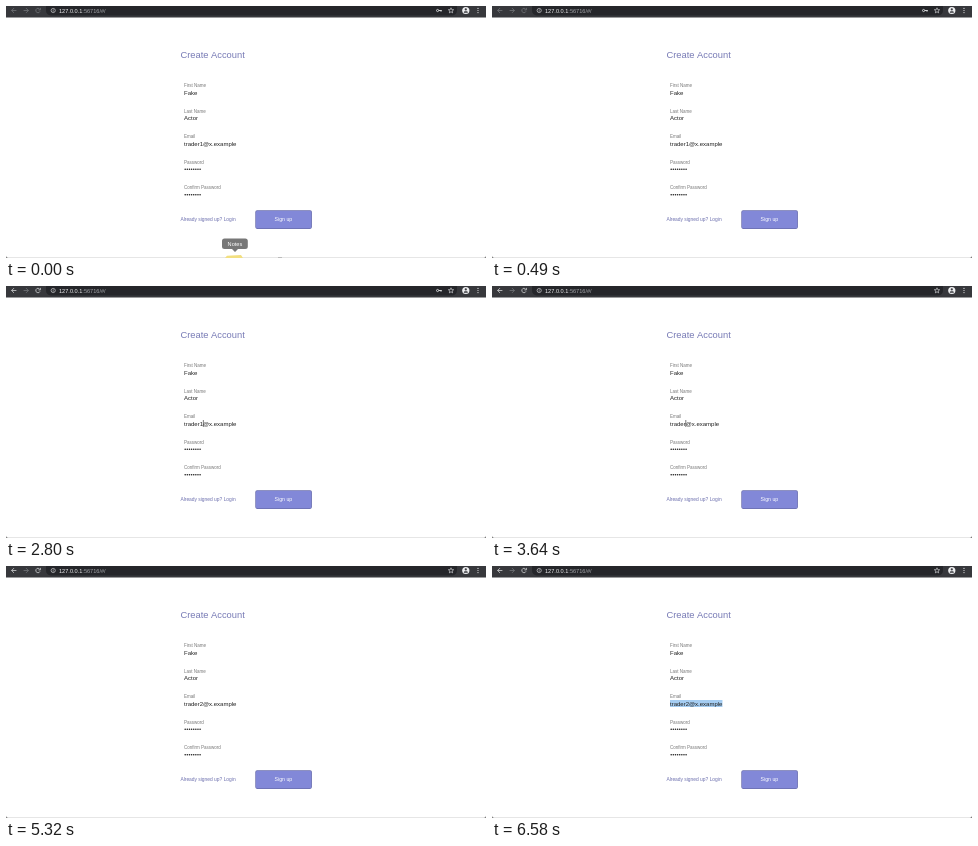
Recreate the animation shown at these times as an HTML page with a canvas. Size 480 by 252 pixels, loop 8 s.

```html
<!DOCTYPE html>
<html lang="en">
<head>
<meta charset="utf-8">
<title>Create Account</title>
<style>
html, body { margin: 0; width: 100%; height: 100%; overflow: hidden; background: #fff; }
canvas { display: block; width: 480px; height: 252px; }
</style>
</head>
<body>
<canvas id="stage"></canvas>
<script>
const W = 480, H = 252, LOOP = 8000;
const canvas = document.getElementById('stage');
const ctx = canvas.getContext('2d');
const dpr = window.devicePixelRatio || 1;
canvas.width = W * dpr;
canvas.height = H * dpr;

const FONT = '"Liberation Sans", Arial, sans-serif';
const BRIGHT = '#e4e5e7', DIM = '#797b80';
const FIELD_X = 178, EMAIL_Y = 139.7;

function text(str, x, y, size, color, align = 'left', weight = 400) {
  ctx.font = `${weight} ${size}px ${FONT}`;
  ctx.textAlign = align;
  ctx.fillStyle = color;
  ctx.fillText(str, x, y);
  return ctx.measureText(str).width;
}

function box(x, y, w, h, r, fill) {
  ctx.beginPath();
  ctx.roundRect(x, y, w, h, r);
  ctx.fillStyle = fill;
  ctx.fill();
}

function disc(x, y, r, fill) {
  ctx.beginPath();
  ctx.arc(x, y, r, 0, Math.PI * 2);
  ctx.fillStyle = fill;
  ctx.fill();
}

function ring(x, y, r, color, width, from = 0, to = Math.PI * 2) {
  ctx.beginPath();
  ctx.arc(x, y, r, from, to);
  ctx.strokeStyle = color;
  ctx.lineWidth = width;
  ctx.stroke();
}

function line(points, color, width) {
  ctx.beginPath();
  points.forEach(([x, y]) => ctx.lineTo(x, y));
  ctx.strokeStyle = color;
  ctx.lineWidth = width;
  ctx.stroke();
}

function arrow(x, y, dir, color) {
  line([[x - 2.4 * dir, y], [x + 2.4 * dir, y]], color, 0.7);
  line([[x, y - 2.4], [x + 2.4 * dir, y], [x, y + 2.4]], color, 0.7);
}

function star(x, y) {
  ctx.beginPath();
  for (let i = 0; i < 10; i++) {
    const r = i % 2 ? 1.2 : 2.8, a = i * Math.PI / 5 - Math.PI / 2;
    ctx.lineTo(x + r * Math.cos(a), y + r * Math.sin(a));
  }
  ctx.closePath();
  ctx.strokeStyle = BRIGHT;
  ctx.lineWidth = 0.6;
  ctx.stroke();
}

function toolbar(t) {
  box(0, 0, W, 11.5, 0, '#37383c');
  box(40, 0, 411, 9.5, [0, 0, 4.7, 4.7], '#25262a');
  const active = t >= 840 ? BRIGHT : DIM;
  arrow(8, 4.5, -1, active);
  arrow(20, 4.5, 1, DIM);
  ring(32, 4.5, 2.2, active, 0.7, 0.4, 5.4);
  line([[34.4, 1.9], [34.4, 3.9], [32.4, 3.9]], active, 0.7);

  ring(47.2, 4.5, 2.1, BRIGHT, 0.6);
  line([[47.2, 4.2], [47.2, 5.7]], BRIGHT, 0.6);
  disc(47.2, 3.3, 0.35, BRIGHT);
  const hostWidth = text('127.0.0.1', 53, 6.5, 5.6, '#f0f0f1', 'left', 500);
  text(':56716/#/', 53 + hostWidth, 6.5, 5.6, '#a2a4a8');

  if (t < 3640) {
    ring(431.6, 4.5, 1.1, BRIGHT, 0.8);
    line([[432.7, 4.5], [435.8, 4.5]], BRIGHT, 0.9);
    line([[435, 4.5], [435, 5.8]], BRIGHT, 0.8);
  }
  star(445, 4.6);
  disc(459.8, 4.5, 3.6, '#eeeff1');
  disc(459.8, 3.4, 1.1, '#37383c');
  box(457.8, 5.2, 4, 1.5, [1.2, 1.2, 0, 0], '#37383c');
  [2.4, 4.5, 6.6].forEach(y => disc(472, y, 0.6, BRIGHT));
}

function within(t, spans) {
  return spans.some(([from, to]) => t >= from && t < to);
}

function email(t) {
  const name = 'trader' + (t < 3570 ? '1' : t < 3990 ? '' : '2');
  const full = name + '@x.example';
  ctx.font = `400 6px ${FONT}`;
  const caretX = FIELD_X + ctx.measureText(name).width;
  const end = FIELD_X + ctx.measureText(full).width;

  if (t >= 6230) {
    const from = t < 6580 ? caretX : FIELD_X;
    box(from, 134, end - from, 7, 0, '#a5cdf2');
  }
  text(full, FIELD_X, EMAIL_Y, 6, '#222');
  const caretOn = [[1610, 1960], [2800, 3220], [3570, 4620], [4830, 5320], [5810, 6230]];
  if (within(t, caretOn)) box(caretX - 0.1, 134, 0.6, 7, 0, '#222');
}

function form(t) {
  text('Create Account', 174.4, 51.8, 9.36, '#777ab5');
  ['First Name', 'Last Name', 'Email', 'Password', 'Confirm Password'].forEach((label, i) =>
    text(label, FIELD_X, 81.2 + i * 25.5, 4.5, '#777'));
  text('Fake', FIELD_X, 88.8, 6, '#222');
  text('Actor', FIELD_X, 114.2, 6, '#222');
  email(t);
  for (const y of [163.3, 188.8])
    for (let i = 0; i < 8; i++) disc(179.2 + i * 2.13, y, 0.8, '#222');

  text('Already signed up? Login', 174.4, 215.2, 4.9, '#6c6fae');
  box(249.3, 204.2, 56.6, 18.7, 1.8, '#686cac');
  box(250, 204.9, 55.2, 17.3, 1.3, '#8288d8');
  text('Sign up', 277.4, 215.4, 5.2, '#fff', 'center');
}

// The dock label slides down and fades in 70 ms steps.
function dockLabel(t) {
  if (t >= 490) return;
  const step = t < 140 ? 0 : Math.floor(t / 70) - 1;
  const dx = Math.min(4.5, step * 1.5), dy = step * 2.9;
  ctx.save();
  if (step < 2) {
    ctx.translate(0, dy);
    ctx.beginPath();
    ctx.moveTo(219, 252);
    ctx.lineTo(221, 249.8);
    ctx.lineTo(235, 249);
    ctx.lineTo(237, 252);
    ctx.fillStyle = '#f2df80';
    ctx.fill();
    box(272, 251, 4, 1, 0, '#bbb');
    ctx.translate(0, -dy);
  }
  ctx.translate(dx, dy);
  ctx.globalAlpha = 1 - step * 0.1;
  ctx.beginPath();
  ctx.roundRect(216, 232.4, 25.8, 10.6, 2.5);
  ctx.moveTo(226, 243);
  ctx.lineTo(229, 246);
  ctx.lineTo(232, 243);
  ctx.fillStyle = '#777';
  ctx.fill();
  text('Notes', 228.9, 239.7, 5.6, '#fff', 'center');
  ctx.restore();
}

function windowEdge() {
  box(0, 251.3, W, 0.7, 0, '#dedede');
  for (const [x, dir] of [[0, 1], [W, -1]]) {
    ctx.beginPath();
    ctx.moveTo(x, 249.8);
    ctx.quadraticCurveTo(x, H, x + 2.2 * dir, H);
    ctx.lineTo(x, H);
    ctx.fillStyle = '#555';
    ctx.fill();
  }
}

function draw() {
  const t = performance.now() % LOOP;
  ctx.setTransform(dpr, 0, 0, dpr, 0, 0);
  box(0, 0, W, H, 0, '#fff');
  toolbar(t);
  form(t);
  windowEdge();
  dockLabel(t);
  requestAnimationFrame(draw);
}
draw();
</script>
</body>
</html>
```
